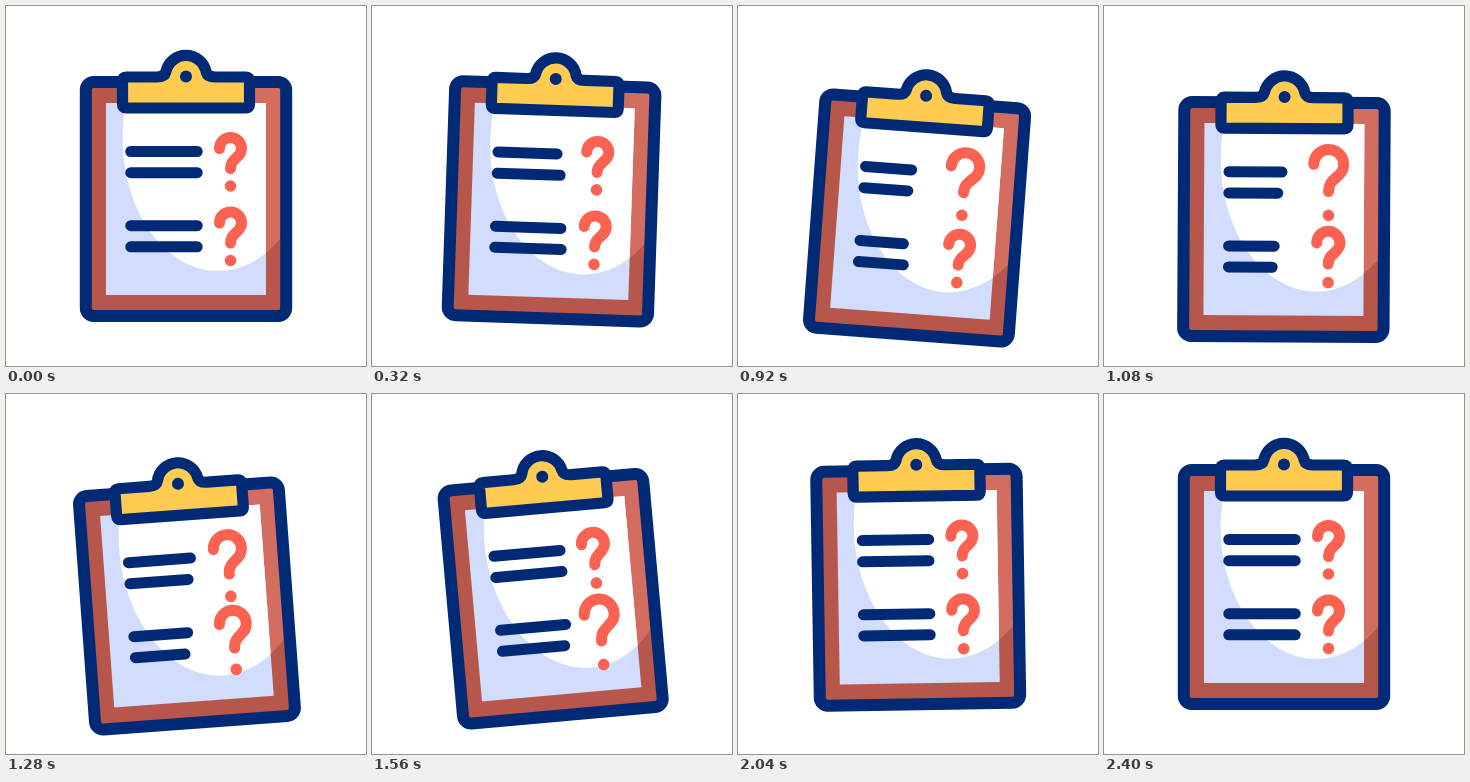
Animation, 360 px wide and 360 px high, one loop 2440 ms. Source, as an HTML page with a canvas:

```html
<!DOCTYPE html>
<html lang="en">
<head>
<meta charset="utf-8">
<title>Clipboard</title>
<style>
  html, body { margin: 0; width: 100%; height: 100%; overflow: hidden; background: #fff; }
  canvas { display: block; width: 360px; height: 360px; }
</style>
</head>
<body>
<canvas id="stage"></canvas>
<script>
const LOOP = 2440;
const NAVY = '#002976', BROWN = '#b7564b', BROWN_LIT = '#d26d60';
const PAPER = '#d2dcfc', YELLOW = '#ffcb50', CORAL = '#fc6252';

const canvas = document.getElementById('stage');
const ctx = canvas.getContext('2d');
const ratio = window.devicePixelRatio || 1;
canvas.width = canvas.height = 360 * ratio;

const smooth = x => x * x * (3 - 2 * x);

// Eased value at time t through [time, value] keys.
function track(t, keys) {
  if (t <= keys[0][0]) return keys[0][1];
  for (let i = 1; i < keys.length; i++) {
    const [t0, v0] = keys[i - 1], [t1, v1] = keys[i];
    if (t < t1) return v0 + (v1 - v0) * smooth((t - t0) / (t1 - t0));
  }
  return keys[keys.length - 1][1];
}

// Eased rise to 1 and back to 0.
const pulse = (t, start, half) =>
  track(t, [[start, 0], [start + half, 1], [start + 2 * half, 0]]);

const TILT = [[80, 0], [740, 6.4], [1400, -5.2], [1500, -5.2], [2240, 0]];
const DROP = [[115, 0], [1080, 20.5], [1120, 20.5], [2100, 0]];
const ROWS = [145.5, 166.7, 219.7, 240.8];

const boardPath = new Path2D();
boardPath.roundRect(79.8, 76, 200.4, 234, 8);

const pagePath = new Path2D();
pagePath.rect(100, 97, 160, 192);

const glowPath = new Path2D();
glowPath.ellipse(212, 132, 95.5, 133, 0, 0, 2 * Math.PI);

const clipPath = new Path2D(
  'M120 71H151Q158.5 71 159.8 66A20.6 20.6 0 0 1 200.2 66Q201.5 71 209 71H240' +
  'Q243.5 71 243.5 74.5V98.5Q243.5 102 240 102H120Q116.5 102 116.5 98.5V74.5Q116.5 71 120 71Z');

function stroke(path, color, width) {
  ctx.strokeStyle = color;
  ctx.lineWidth = width;
  ctx.stroke(path);
}

function disc(x, y, r, color) {
  ctx.fillStyle = color;
  ctx.beginPath();
  ctx.arc(x, y, r, 0, 2 * Math.PI);
  ctx.fill();
}

// Fills a shape, with the lit colour where the glow overlaps it.
function fillLit(path, color, litColor) {
  ctx.fillStyle = color;
  ctx.fill(path);
  ctx.save();
  ctx.clip(glowPath);
  ctx.fillStyle = litColor;
  ctx.fill(path);
  ctx.restore();
}

function drawBoard() {
  fillLit(boardPath, BROWN, BROWN_LIT);
  fillLit(pagePath, PAPER, '#fff');
  stroke(boardPath, NAVY, 12);
}

function drawClip() {
  ctx.fillStyle = YELLOW;
  ctx.fill(clipPath);
  stroke(clipPath, NAVY, 11.2);
  disc(180, 70.5, 6, NAVY);
}

function drawRow(y, cut) {
  const line = new Path2D();
  line.moveTo(124.8, y);
  line.lineTo(191.2 - cut, y);
  stroke(line, NAVY, 11);
}

// The mark grows while its line weight and dot stay the same.
function drawQuestion(y, scale) {
  const r = 11 * scale;
  const hook = new Path2D();
  hook.arc(0, -13.5 * scale, r, Math.PI, 0);
  hook.bezierCurveTo(r, -3.5 * scale, 0, -4.5 * scale, 0, 6.5 * scale);
  ctx.save();
  ctx.translate(224.5, y);
  stroke(hook, CORAL, 11);
  disc(0, 24 * scale, 5.8, CORAL);
  ctx.restore();
}

function draw(t) {
  ctx.setTransform(ratio, 0, 0, ratio, 0, 0);
  ctx.fillStyle = '#fff';
  ctx.fillRect(0, 0, 360, 360);
  ctx.lineCap = ctx.lineJoin = 'round';

  ctx.translate(180, 180 + track(t, DROP));
  ctx.rotate(track(t, TILT) * Math.PI / 180);
  ctx.translate(-180, -180);

  drawBoard();
  drawClip();
  ROWS.forEach((y, i) => drawRow(y, 23 * pulse(t, 55 + 90 * i, 710)));
  drawQuestion(156, 1 + 0.36 * pulse(t, 480, 610));
  drawQuestion(230.5, 1 + 0.36 * pulse(t, 925, 615));
}

const startTime = performance.now();
function tick() {
  draw((performance.now() - startTime) % LOOP);
  requestAnimationFrame(tick);
}
tick();
</script>
</body>
</html>
```
